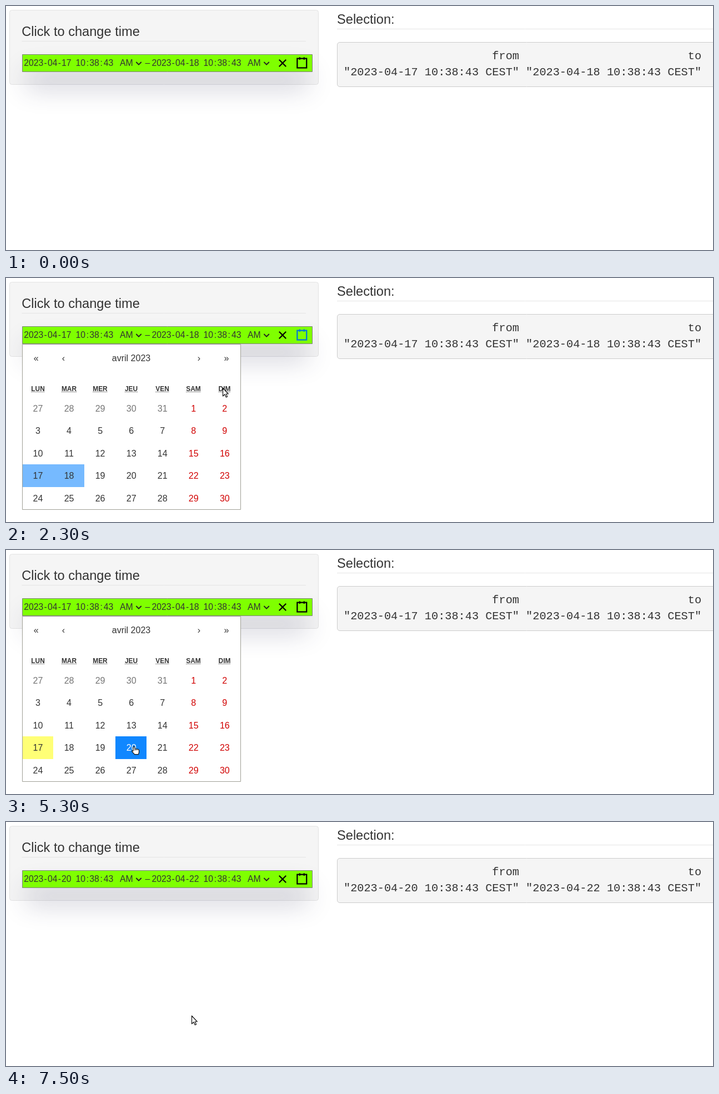
Animation, 1273 px wide and 440 px high, one loop 8 s. Source, as an HTML page with a canvas:

```html
<!DOCTYPE html>
<html lang="en">
<head>
<meta charset="utf-8">
<title>Date range picker</title>
<style>
html, body { margin: 0; width: 1273px; height: 440px; overflow: hidden; background: #fff; }
canvas { display: block; }
</style>
</head>
<body>
<canvas id="stage" width="1273" height="440"></canvas>
<script>
const ctx = document.getElementById('stage').getContext('2d');
const SANS = '"Liberation Sans", Arial, sans-serif';
const MONO = '"Liberation Mono", "Courier New", monospace';
const LOOP = 8000, OPEN = 1200, FIRST_CLICK = 4100, SECOND_CLICK = 7300, CLOSE = 7500;

// Pointer path: time, x, y
const PATH = [
  [100, 468, 11], [300, 505, 65], [500, 525, 100], [700, 530, 108],
  [1800, 530, 108], [2200, 430, 180], [2700, 228, 272], [2800, 229, 308],
  [2900, 229, 335], [3000, 227, 346], [3400, 224, 357], [5200, 224, 357],
  [5300, 226, 354], [5500, 236, 326], [5700, 250, 318], [5900, 270, 328],
  [6100, 286, 345], [6200, 318, 350], [6300, 332, 349], [6400, 332, 349],
  [6500, 330, 348], [7400, 330, 348], [7500, 334, 349]
];

const HAND = new Path2D('M3 8V1.8Q4.5 -.4 6 1.8V5Q13.5 4.4 13.5 7.2V11L12.4 14.6H5.6L1 9.6Q.4 7.2 3 8.5Z');
const KNUCKLES = new Path2D('M6 5V8M8.5 5.5V7.5M11 6V7.5');
const ARROW = new Path2D('M.5 .5V15L4 11.8L6.3 17L8.6 16L6.3 11H10.3Z');

function text(str, x, y, size, { color = '#333', family = SANS, align = 'left', weight = '' } = {}) {
  ctx.font = `${weight} ${size}px ${family}`;
  ctx.fillStyle = color;
  ctx.textAlign = align;
  ctx.fillText(str, x, y);
}

function line(points, color, width = 1) {
  ctx.beginPath();
  points.forEach(([x, y]) => ctx.lineTo(x, y));
  ctx.strokeStyle = color;
  ctx.lineWidth = width;
  ctx.stroke();
}

function box(x, y, w, h, fill, border, radius = 0) {
  ctx.beginPath();
  ctx.roundRect(x + .5, y + .5, w - 1, h - 1, radius);
  ctx.fillStyle = fill;
  ctx.fill();
  ctx.strokeStyle = border;
  ctx.lineWidth = 1;
  ctx.stroke();
}

function at(x, y, scale, draw) {
  ctx.save();
  ctx.translate(x, y);
  ctx.scale(scale, scale);
  draw();
  ctx.restore();
}

function pointerAt(t) {
  if (t < PATH[0][0]) return null;
  const next = PATH.findIndex(k => k[0] > t);
  if (next < 0) return PATH.at(-1).slice(1);
  const [t0, x0, y0] = PATH[next - 1], [t1, x1, y1] = PATH[next];
  const p = (t - t0) / (t1 - t0);
  return [x0 + (x1 - x0) * p, y0 + (y1 - y0) * p];
}

const colX = i => Math.floor(30 + 55.96 * i);
const rowY = k => Math.round(214.6 + 40.6 * k);

// Index of the tile under the pointer, or -1
function tileAt([x, y]) {
  const col = Math.floor((x + 4.5 - 30) / 55.96), row = Math.floor((y - 214.6) / 40.6);
  return col >= 0 && col < 7 && row >= 0 && row < 5 ? row * 7 + col : -1;
}

function dropShadow() {
  ctx.save();
  ctx.shadowColor = 'rgba(50,50,93,.25)';
  ctx.shadowBlur = 45;
  ctx.shadowOffsetX = 3000;
  ctx.fillStyle = '#000';
  ctx.fillRect(37 - 3000, 120, 506, 28);
  ctx.restore();
}

function dateField(x, day) {
  const parts = [['2023', 0], ['-', 36.2], ['04', 42.6], ['-', 61.5], [day, 67.6],
    ['10', 93.1], [':', 112.4], ['38', 118], [':', 137.2], ['43', 143.5], ['AM', 172.7]];
  for (const [str, dx] of parts) text(str, x + dx, 108, 15.75);
  line([[x + 202, 101], [x + 206.7, 105.7], [x + 211.4, 101]], '#222', 1.8);
}

function icons(active) {
  at(487.3, 92.3, 1.125, () => {
    line([[4, 4], [15, 15]], '#000', 2);
    line([[15, 4], [4, 15]], '#000', 2);
  });
  at(522.1, 92.4, 1.125, () => {
    const color = active ? '#0078d7' : '#000';
    line([[6, 0], [6, 4]], color, 2);
    line([[13, 0], [13, 4]], color, 2);
    ctx.strokeRect(2, 2, 15, 15);
  });
}

function page(from, to, iconActive) {
  box(6, 7, 557, 135, '#f5f5f5', '#e3e3e3', 4);
  dropShadow();
  text('Click to change time', 28.2, 54, 23.625);
  line([[28.5, 63.5], [540, 63.5]], '#e5e5e5');
  box(29, 87, 523, 32, '#7fff00', '#808080');
  dateField(32.3, from);
  text('–', 250.6, 108, 15.75);
  dateField(262.4, to);
  icons(iconActive);

  text('Selection:', 596, 32, 23.625);
  line([[596, 41.5], [1273, 41.5]], '#e5e5e5');
  box(596, 65, 690, 81, '#f5f5f5', '#ccc', 4.5);
  const mono = { family: MONO };
  const stamp = day => `"2023-04-${day} 10:38:43 CEST"`;
  text('from'.padStart(26) + 'to'.padStart(27), 608, 96, 20.25, mono);
  text(`${stamp(from)} ${stamp(to)}`, 608, 125, 20.25, mono);
}

function tileFill(day, hovered, t) {
  if (t < FIRST_CLICK) {
    if (day === 17 || day === 18) return '#76baff';
    return day === hovered ? '#e6e6e6' : null;
  }
  if (t >= SECOND_CLICK && (day === 20 || day === 21)) return '#006edc';
  if (day === 20) return '#1087ff';
  if (hovered !== null && day >= Math.min(hovered, 20) && day <= Math.max(hovered, 20)) return '#e6e6e6';
  return day === 17 ? '#ffff76' : null;
}

function calendar(t, pointer) {
  const center = { align: 'center' };
  box(29, 119, 394, 299, '#fff', '#a0a096');
  [['«', 54.3], ['‹', 103.5], ['avril 2023', 225.5], ['›', 347.5], ['»', 397]]
    .forEach(([str, x]) => text(str, x, 150, 16, center));

  ['LUN', 'MAR', 'MER', 'JEU', 'VEN', 'SAM', 'DIM'].forEach((name, i) => {
    const x = 57.5 + 56 * i;
    text(name, x, 204, 11.9, { align: 'center', weight: 'bold' });
    const half = ctx.measureText(name).width / 2;
    ctx.setLineDash([1, 1]);
    line([[x - half, 205.5], [x + half, 205.5]], '#333');
    ctx.setLineDash([]);
  });

  const tile = tileAt(pointer);
  const hovered = tile < 0 ? null : tile - 4;
  for (let i = 0; i < 35; i++) {
    const day = i - 4, col = i % 7, row = Math.floor(i / 7);
    const x = colX(col), y = rowY(row);
    const fill = tileFill(day, hovered, t);
    if (fill) {
      ctx.fillStyle = fill;
      ctx.fillRect(x, y, colX(col + 1) - x, rowY(row + 1) - y);
    }
    // The last tile is only partly repainted before the popup closes
    if (t >= SECOND_CLICK && day === 22) {
      ctx.fillStyle = '#006edc';
      ctx.fillRect(x, y, 21, rowY(row + 1) - y);
    }
    const selected = t >= FIRST_CLICK && (day === 20 || t >= SECOND_CLICK && day === 21);
    const color = selected ? '#fff' : col > 4 ? '#d10000' : day < 1 ? '#757575' : '#333';
    text(day < 1 ? day + 31 : day, 57.5 + 56.05 * col, Math.round(240.6 + 40.6 * row), 16, { color, align: 'center' });
  }
}

function cursor([x, y], hand) {
  at(Math.round(x), Math.round(y), 1, () => {
    const shape = hand ? HAND : ARROW;
    ctx.fillStyle = '#fff';
    ctx.strokeStyle = '#111';
    ctx.lineWidth = 1.2;
    ctx.lineJoin = 'round';
    ctx.fill(shape);
    ctx.stroke(shape);
    if (hand) {
      ctx.lineWidth = .8;
      ctx.stroke(KNUCKLES);
    }
  });
}

function frame(now) {
  const t = Math.floor(now % LOOP / 100) * 100;
  const pointer = pointerAt(t);
  const open = t >= OPEN && t < CLOSE;
  const done = t >= CLOSE;
  ctx.fillStyle = '#fff';
  ctx.fillRect(0, 0, 1273, 440);
  page(done ? '20' : '17', done ? '22' : '18', t >= 500 && t < 3900);
  if (open) calendar(t, pointer);
  if (pointer) {
    const [x, y] = pointer;
    const onIcon = x > 517 && y > 90 && y < 119;
    cursor(pointer, onIcon || open && tileAt(pointer) >= 0);
  }
}

let start;
function tick(now) {
  start ??= now;
  frame(now - start);
  requestAnimationFrame(tick);
}
frame(0);
requestAnimationFrame(tick);
</script>
</body>
</html>
```
